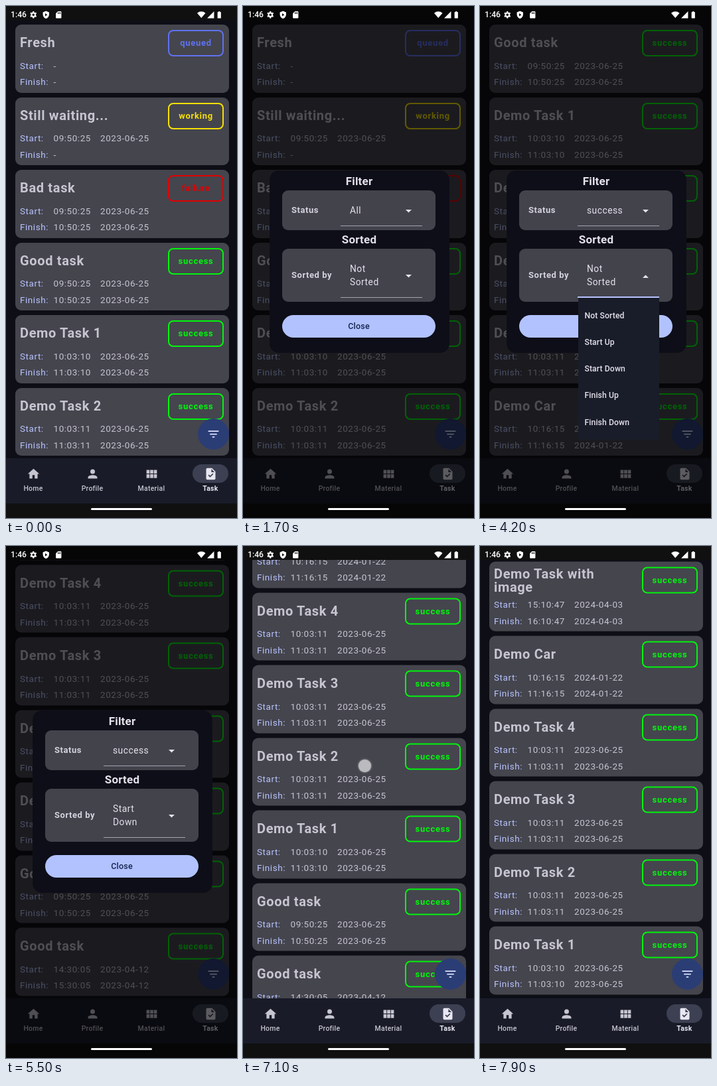
An HTML page that plays this animation: 348 px wide and 772 px high, repeating every 8000 ms.

```html
<!DOCTYPE html>
<html lang="en">
<head>
<meta charset="utf-8">
<title>Task list filter</title>
<style>
  html, body { margin: 0; width: 100%; height: 100%; overflow: hidden; background: #000; }
  body { position: relative; font-family: Roboto, "Open Sans", sans-serif; line-height: 20px; color: #c6c5d0; }
  div, span, svg { position: absolute; white-space: pre; }
  svg { fill: currentColor; overflow: visible; }
  #app { left: 0; top: 0; width: 348px; height: 772px; overflow: hidden; background: #101011; }
  #page { left: 0; top: 21px; width: 348px; height: 661px; background: #0e0e17; overflow: hidden; }
  .list { left: 13.5px; top: 7px; width: 322px; }

  .card { left: 0; width: 322px; border-radius: 9px; background: #45454e; }
  .title { left: 7.5px; top: 7px; bottom: 55.5px; display: flex; align-items: center;
           font-weight: 700; font-size: 20px; letter-spacing: .65px; }
  .row { left: 7.5px; height: 20px; font-size: 13.5px; letter-spacing: .55px; }
  .row span { top: 0; }
  .row b { font-weight: 400; color: #b8c4ff; }
  .badge { left: 230.5px; top: 8px; width: 80px; height: 36px; line-height: 36px; border: 2px solid;
           border-radius: 8px; text-align: center; font-weight: 700; font-size: 13px; letter-spacing: .7px; }
  .queued { color: #5f72f0; }
  .working { color: #f7e000; }
  .failure { color: #e00000; }
  .success { color: #00f50c; }

  #fab { left: 289px; top: 622px; width: 47px; height: 47px; border-radius: 50%; background: #2b3d75; color: #dde1ff; }
  #ripple { inset: 0; border-radius: 50%; background: #b8c4ff; }
  #nav { left: 0; top: 682px; width: 348px; height: 68px; background: #191c28; }
  .tab { top: 0; width: 88px; height: 68px; text-align: center; font-weight: 500; font-size: 10.5px; letter-spacing: .25px; }
  .tab svg { left: 33.5px; top: 12.5px; }
  .tab span { left: 0; width: 88px; top: 36px; }
  .tab.on { color: #e8e7f2; font-weight: 700; }
  .tab.on::before { content: ""; position: absolute; left: 17px; top: 9px; width: 54px; height: 28px;
                    border-radius: 14px; background: #3c4052; }

  #scrim { inset: 0; background: #000; }
  #dialog { left: 40px; top: 248px; width: 271px; height: 275px; border-radius: 14px; background: #0e0e18; color: #e4e1ec; }
  .head { left: 0; width: 270px; text-align: center; font-weight: 700; font-size: 17px; letter-spacing: .2px; }
  .field { left: 19px; width: 231px; border-radius: 9px; background: #43434c; }
  .field .name { left: 14px; font-weight: 700; font-size: 13px; letter-spacing: .55px; color: #d4d3de; }
  .field .value { left: 102px; font-size: 13.8px; letter-spacing: .5px; }
  .field .line { left: 88px; width: 123px; bottom: 6px; height: 1px; background: #a5a4af; }
  .field.open .line { height: 2px; background: #b8c4ff; }
  .field svg { left: 185.5px; }
  .field.open svg { transform: scaleY(-1); }
  #close { left: 19px; top: 218px; width: 231px; height: 34px; line-height: 34px; border-radius: 17px;
           background: #b1c2ff; color: #16244f; text-align: center; font-weight: 500; font-size: 12.5px; letter-spacing: .2px; }
  .menu { left: 148px; width: 122px; height: 214px; background: #191d29; color: #e4e1ec; border-radius: 0 0 3px 3px;
          font-weight: 500; font-size: 12.2px; letter-spacing: .1px; }
  .menu span { left: 9.5px; }

  #status { left: 0; top: 0; width: 348px; height: 21px; color: #fff; }
  #clock { left: 7px; top: 3px; font-weight: 500; font-size: 12.2px; }
  #handle { left: 128px; top: 757px; width: 92px; height: 3.4px; border-radius: 2px; background: #fff; }
  #touch { left: 0; top: 0; width: 19px; height: 19px; margin: -9.5px; border-radius: 50%;
           background: #d0d0d3; box-shadow: 0 0 3px #d0d0d3; }
</style>
</head>
<body>
<div id="app">
  <div id="page"></div>
  <div id="fab"><div id="ripple"></div></div>
  <div id="nav"></div>
  <div id="scrim"></div>
  <div id="dialog">
    <div class="head" style="top:6px">Filter</div>
    <div class="field" id="filter" style="top:30px;height:60px">
      <span class="name" style="top:20px">Status</span><span class="value" style="top:20px"></span>
      <svg style="top:28.5px" width="9" height="5"><path d="M0 0h9L4.5 4.5z"/></svg><div class="line"></div>
    </div>
    <div class="head" style="top:94px">Sorted</div>
    <div class="field" id="sort" style="top:118px;height:80px">
      <span class="name" style="top:30px">Sorted by</span><span class="value" style="top:20px"></span>
      <svg style="top:38.5px" width="9" height="5"><path d="M0 0h9L4.5 4.5z"/></svg><div class="line"></div>
    </div>
    <div id="close">Close</div>
  </div>
  <div id="status"><span id="clock">1:46</span></div>
  <div id="handle"></div>
  <div id="touch"></div>
</div>
<script>
const LOOP = 8000, STEP = 100;
const $ = id => document.getElementById(id);

const ICONS = {
  home: 'M10 20v-6h4v6h5v-8h3L12 3 2 12h3v8z',
  person: 'M12 12a4 4 0 1 0 0-8 4 4 0 0 0 0 8zm0 2c-2.7 0-8 1.3-8 4v2h16v-2c0-2.7-5.3-4-8-4z',
  grid: 'M3 5h5.3v6.5H3zm6.3 0h5.4v6.5H9.3zm6.4 0H21v6.5h-5.3zM3 12.5h5.3V19H3zm6.3 0h5.4V19H9.3zm6.4 0H21V19h-5.3z',
  task: 'M14 2H6a2 2 0 0 0-2 2v16a2 2 0 0 0 2 2h12a2 2 0 0 0 2-2V8zM10.9 18l-3.5-3.5 1.4-1.4 2.1 2.1 4.3-4.2 1.4 1.4zM13 9V3.5L18.5 9z',
  filter: 'M10 18h4v-2h-4zM3 6v2h18V6zm3 7h12v-2H6z',
  gear: 'M10 2h4l.5 3 2 1.1 2.8-1.1 2 3.5-2.3 2v3l2.3 2-2 3.5-2.8-1.1-2 1.1-.5 3h-4l-.5-3-2-1.1L4.7 19l-2-3.5 2.3-2v-3l-2.3-2 2-3.5 2.8 1.1 2-1.1zM12 8.5a3.5 3.5 0 1 0 0 7 3.5 3.5 0 0 0 0-7z',
  shield: 'M12 1 3 5v6c0 5.5 3.8 10.7 9 12 5.2-1.3 9-6.5 9-12V5zM9.5 7.5 16 12l-6.5 4.5z',
  card: 'M18 2h-8L4 8v12a2 2 0 0 0 2 2h12a2 2 0 0 0 2-2V4a2 2 0 0 0-2-2zM9.5 5h2v4h-2zm3.2 0h2v4h-2zm3.2 0h2v4h-2z',
  wifi: 'M12 21 0 7a18 18 0 0 1 24 0z',
  signal: 'M2 22h20V2z',
  battery: 'M16 4h-2V2h-4v2H8a1 1 0 0 0-1 1v16a1 1 0 0 0 1 1h8a1 1 0 0 0 1-1V5a1 1 0 0 0-1-1z'
};
const icon = (name, size, style = '') =>
  `<svg width="${size}" height="${size}" viewBox="0 0 24 24" style="${style}"><path fill-rule="evenodd" d="${ICONS[name]}"/></svg>`;
const add = (parent, html) => {
  parent.insertAdjacentHTML('beforeend', html);
  return parent.lastElementChild;
};

// Task lists: everything, finished only, finished by latest start.
const task = (name, status, date, start, finish) => ({ name, status, date, start, finish });
const tasks = [
  task('Fresh', 'queued'),
  task('Still waiting...', 'working', '2023-06-25', '09:50:25'),
  task('Bad task', 'failure', '2023-06-25', '09:50:25', '10:50:25'),
  task('Good task', 'success', '2023-06-25', '09:50:25', '10:50:25'),
  task('Demo Task 1', 'success', '2023-06-25', '10:03:10', '11:03:10'),
  task('Demo Task 2', 'success', '2023-06-25', '10:03:11', '11:03:11'),
  task('Demo Task 3', 'success', '2023-06-25', '10:03:11', '11:03:11'),
  task('Demo Task 4', 'success', '2023-06-25', '10:03:11', '11:03:11'),
  task('Demo Car', 'success', '2024-01-22', '10:16:15', '11:16:15'),
  task('Demo Task with\nimage', 'success', '2024-04-03', '15:10:47', '16:10:47'),
  task('Good task', 'success', '2023-04-12', '14:30:05', '15:30:05')
];
const done = tasks.filter(t => t.status === 'success');
const key = t => t.date + t.start;
const latest = [...done].sort((a, b) => key(a).localeCompare(key(b))).reverse();

const row = (label, time, date, bottom) =>
  `<div class="row" style="bottom:${bottom}px"><b>${label}</b><span style="left:50.5px">${time || '-'}</span>` +
  `<span style="left:121px">${time ? date : ''}</span></div>`;

function buildList(items) {
  const list = add($('page'), '<div class="list"></div>');
  let y = 0;
  for (const t of items) {
    const h = t.name.includes('\n') ? 105 : 102.5;
    add(list, `<div class="card" style="top:${y}px;height:${h}px"><div class="title">${t.name}</div>` +
      row('Start:', t.start, t.date, 31) + row('Finish:', t.finish, t.date, 6.5) +
      `<div class="badge ${t.status}">${t.status}</div></div>`);
    y += h + 7;
  }
  return list;
}
const lists = [tasks, done, latest].map(buildList);
const LATEST_END = -221.5;

const buildMenu = (top, items) => {
  const menu = add($('app'), `<div class="menu" style="top:${top}px"></div>`);
  items.forEach((s, i) => add(menu, `<span style="top:${16.5 + i * 40.3}px">${s}</span>`));
  return menu;
};
const statusMenu = buildMenu(332, ['All', 'queued', 'working', 'failure', 'success']);
const sortMenu = buildMenu(440, ['Not Sorted', 'Start Up', 'Start Down', 'Finish Up', 'Finish Down']);
$('app').append($('touch'));

[['home', 'Home'], ['person', 'Profile'], ['grid', 'Material'], ['task', 'Task']].forEach(([name, label], i) =>
  add($('nav'), `<div class="tab${i === 3 ? ' on' : ''}" style="left:${-3 + i * 89}px">${icon(name, 21)}<span>${label}</span></div>`));
add($('fab'), icon('filter', 21, 'left:13px;top:13px'));
[['gear', 41], ['shield', 60], ['card', 79], ['wifi', 294], ['signal', 308], ['battery', 321.5]].forEach(([name, x]) =>
  add($('status'), icon(name, 12.5, `left:${x - 6.25}px;top:6.5px`)));

// Piecewise linear value through [time, value] points.
function track(t, points) {
  let [t0, v0] = points[0];
  for (const [t1, v1] of points) {
    if (t < t1) return t <= t0 ? v0 : v0 + (v1 - v0) * (t - t0) / (t1 - t0);
    [t0, v0] = [t1, v1];
  }
  return v0;
}

const DIALOG = [[1400, 0], [1500, .4], [1600, .85], [1700, 1], [6100, 1], [6200, .85], [6300, .44], [6400, .13], [6500, 0]];
const STATUS_MENU = [[2500, 0], [2600, .6], [2700, 1], [3600, 1], [3800, 0]];
const SORT_MENU = [[4000, 0], [4100, .6], [4200, 1], [5100, 1], [5300, 0]];
const SCROLL = [[6900, 0], [7000, 10], [7100, 42], [7200, 94], [7300, 142], [7400, 173], [7500, 191],
  [7600, 203], [7700, 211], [7800, 215.5], [7900, 217]];
const TAPS = [[1100, 312, 634], [2400, 229, 305], [3400, 187, 520], [3800, 240, 406], [4900, 187, 547], [6050, 190, 478]];
const TAP_FADE = [[0, 0], [100, .65], [200, .45], [300, .22], [400, 0]];
const DRAG_FADE = [[6800, 0], [6900, .5], [7000, .85], [7200, .85], [7300, .6], [7500, 0]];

function render(t) {
  const stage = t < 3700 ? 0 : t < 5200 ? 1 : 2;
  const scroll = track(t, SCROLL);
  lists.forEach((list, i) => list.style.visibility = i === stage ? 'visible' : 'hidden');
  lists[2].style.transform = `translateY(${LATEST_END + scroll}px)`;

  const shown = track(t, DIALOG);
  $('scrim').style.opacity = shown * .6;
  $('dialog').style.opacity = shown;
  $('dialog').style.transform = `translateY(${(shown - 1) * 9}px)`;

  const menus = [[statusMenu, STATUS_MENU, 'filter'], [sortMenu, SORT_MENU, 'sort']];
  for (const [menu, points, field] of menus) {
    const open = track(t, points);
    menu.style.opacity = open;
    $(field).classList.toggle('open', open > .55);
  }
  $('filter').querySelector('.value').textContent = stage ? 'success' : 'All';
  $('sort').querySelector('.value').textContent = stage === 2 ? 'Start\nDown' : 'Not\nSorted';

  const tap = TAPS.find(([start]) => t >= start && t < start + 400);
  const [x, y, alpha] = tap ? [tap[1], tap[2], track(t - tap[0], TAP_FADE)]
    : [183, 289 + scroll, track(t, DRAG_FADE)];
  $('touch').style.opacity = alpha;
  $('touch').style.transform = `translate(${x}px, ${y}px)`;
  $('ripple').style.opacity = tap === TAPS[0] ? alpha * .25 : 0;
}

// The picture advances in whole steps.
function tick() {
  render(Math.floor(performance.now() % LOOP / STEP) * STEP);
  requestAnimationFrame(tick);
}
tick();
</script>
</body>
</html>
```
